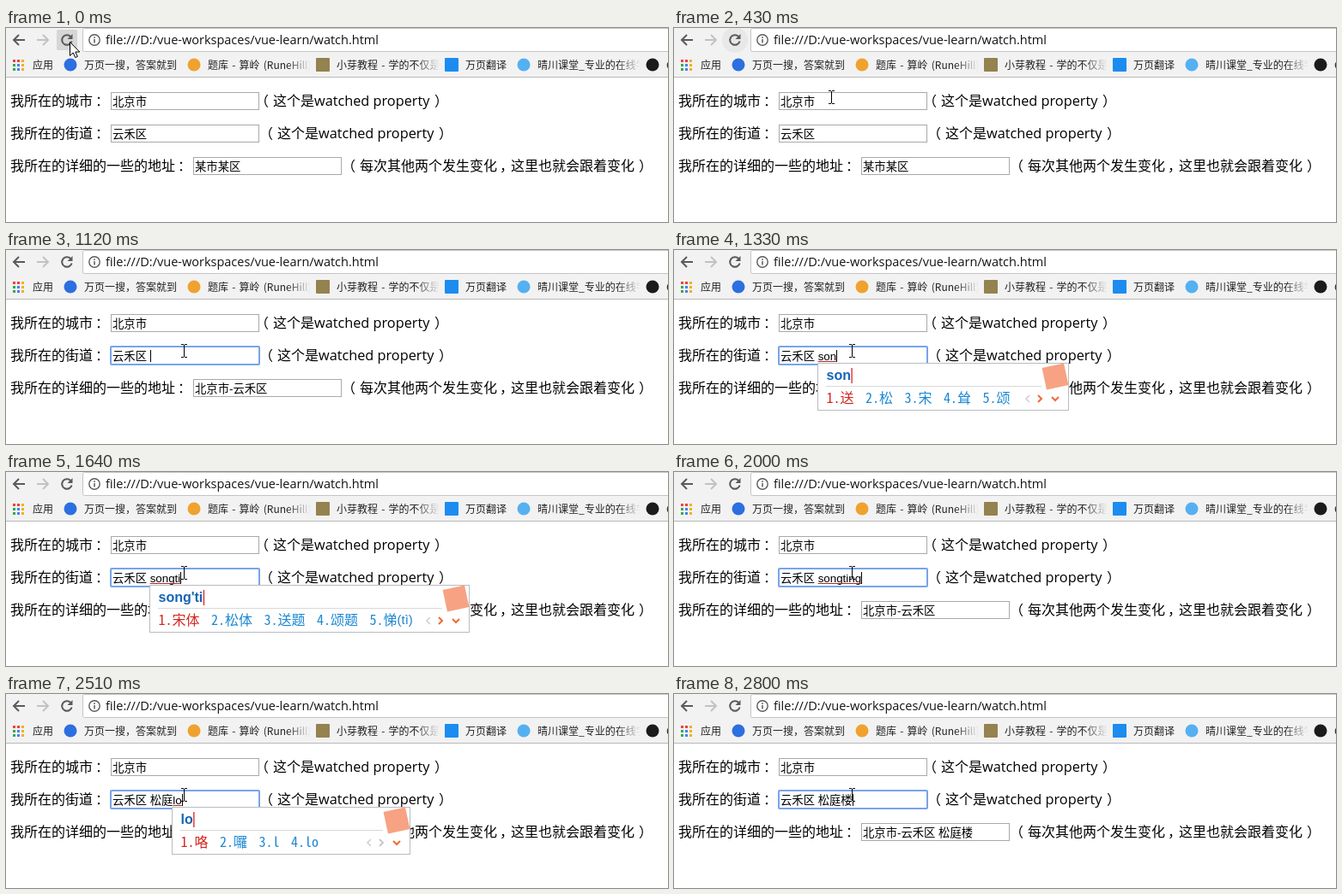
An HTML page for the animation above (3190 ms loop, 771x227 px).

```html
<!DOCTYPE html>
<html lang="zh-CN">
<head>
<meta charset="utf-8">
<title>watch</title>
<style>
html, body { margin: 0; width: 100%; height: 100%; overflow: hidden; background: #fff; }
svg { display: block; width: 771px; height: 227px; }
text { white-space: pre; }
.bar { font: 12px "Noto Sans CJK SC", sans-serif; word-spacing: 1.5px; fill: #222; }
.url { font: 14.5px "Open Sans", sans-serif; fill: #111; }
.page { font: 16px "Noto Sans CJK SC", sans-serif; fill: #000; }
.latin { font: 16.3px "Open Sans", sans-serif; fill: #000; }
.field { font: 13.333px "Liberation Sans", "Noto Sans CJK SC", sans-serif; fill: #000; }
.hint { font: bold 16px "Liberation Sans", sans-serif; fill: #1565b4; }
.pick { font: 16px "Noto Sans Mono CJK SC", "Noto Sans CJK SC", monospace; }
.note { font: 15px "Liberation Sans", sans-serif; }
</style>
</head>
<body>
<svg id="stage" viewBox="0 0 771 227">
  <defs>
    <linearGradient id="fade">
      <stop offset="0" stop-color="#f2f2f2" stop-opacity="0"/>
      <stop offset=".7" stop-color="#f2f2f2"/>
    </linearGradient>
  </defs>
</svg>
<script>
const LOOP = 3190;
const stage = document.getElementById('stage');

function el(tag, attrs, parent = stage) {
  const node = document.createElementNS('http://www.w3.org/2000/svg', tag);
  for (const key in attrs) node.setAttribute(key, attrs[key]);
  return parent.appendChild(node);
}
function box(x, y, width, height, fill, more, parent) {
  return el('rect', { x, y, width, height, fill, ...more }, parent);
}
function line(d, stroke, width, parent) {
  return el('path', { d, stroke, 'stroke-width': width, fill: 'none' }, parent);
}
function label(cls, x, y, str, parent, more) {
  const node = el('text', { class: cls, x, y, ...more }, parent);
  node.textContent = str;
  return node;
}
function show(node, on) {
  node.setAttribute('visibility', on ? 'visible' : 'hidden');
}

// Browser toolbar
box(0, 0, 771, 57, '#f2f2f2');
const hover = box(59, 2, 24, 24, '#d6d6d6', { rx: 2 });
const ripple = el('circle', { cx: 71, cy: 14, r: 15, fill: '#cfcfcf' });
line('M22 14H9M15 8L9 14L15 20', '#5a5a5a', 2);
line('M36 14H49M43 8L49 14L43 20', '#c2c2c2', 2);
line('M75.2 10A5.8 5.8 0 1 0 76.6 15.5', '#5a5a5a', 2);
el('path', { d: 'M77.5 7V13H71.5Z', fill: '#5a5a5a' });
box(89.5, 0.5, 690, 27, '#fff', { rx: 2, stroke: '#c4c4c4' });
el('circle', { cx: 103, cy: 14, r: 6.2, fill: 'none', stroke: '#5a5a5a', 'stroke-width': 1.4 });
line('M103 10.3V11.9M103 13V17.6', '#5a5a5a', 1.5);
label('url', 116, 19, 'file:///D:/vue-workspaces/vue-learn/watch.html');

// Bookmarks
const tints = ['#e8453c', '#e8453c', '#f2b01e', '#35a853', '#4285f4', '#f2b01e', '#35a853', '#4285f4', '#f2b01e'];
tints.forEach((c, i) => box(8 + i % 3 * 5, 37 + Math.floor(i / 3) * 5, 3, 3, c));
label('bar', 31, 48, '应用');

function bookmark(x, fill, round, str, long) {
  label('bar', x + 16, 48, str);
  if (long) box(x + 108, 32, 40, 24, 'url(#fade)');
  if (round) el('circle', { cx: x, cy: 43, r: 7.5, fill });
  else box(x - 8, 35, 16, 16, fill, { rx: 1 });
}
bookmark(75, '#2c6fe0', true, '万页一搜，答案就到');
bookmark(219, '#f0a22e', true, '题库 - 算岭 (RuneHill)', true);
bookmark(369, '#94824f', false, '小芽教程 - 学的不仅是技', true);
bookmark(519, '#1c8cf0', false, '万页翻译');
bookmark(603, '#55b0f2', true, '晴川课堂_专业的在线学', true);
bookmark(753, '#1b1b1b', true, 'O');
box(0, 57, 771, 1, '#b8b8b8');

// Page
function phrase(x, y, str) { label('page', x, y, str); }
function input(x, y, str) {
  box(x + 0.5, y + 0.5, 172, 20, '#fff', { stroke: '#a9a9a9' });
  return label('field', x + 2, y + 16, str);
}
function watched(x, y) {
  phrase(x - 21, y, '（');
  phrase(x, y, '这个是');
  label('latin', x + 48, y, 'watched property');
  phrase(x + 188, y, '）');
}
phrase(5, 91, '我所在的城市');
phrase(104, 91, '：');
input(122, 75, '北京市');
watched(311, 91);

phrase(5, 129, '我所在的街道');
phrase(104, 129, '：');
const street = input(122, 113, '');
const ring = box(122, 113, 173, 21, 'none', { rx: 1, stroke: '#78a4ea', 'stroke-width': 2 });
const caret = box(0, 117, 1, 14, '#000');
const under = box(0, 130, 0, 1, '#b02a2a');
watched(316, 129);

phrase(5, 167, '我所在的详细的一些的地址');
phrase(200, 167, '：');
const address = input(218, 151, '');
phrase(391, 167, '（');
phrase(412, 167, '每次其他两个发生变化');
phrase(575, 167, '，');
phrase(588, 167, '这里也就会跟着变化');
phrase(737, 167, '）');

// Input method window: right edge and candidates for each spelling
const menus = {
  "s": [460, '是 说 三 上 所'],
  "so": [460, '所 搜 送 松 嗽'],
  "son": [460, '送 松 宋 耸 颂'],
  "song": [460, '送 松 宋 颂 耸'],
  "song't": [540, '宋体 送他 松土 松塔 颂题'],
  "song'ti": [540, '宋体 松体 送题 颂题 悌(tì)'],
  "song'tin": [540, '颂听 松停 送停 宋体 听'],
  "song'ting": [554, '松庭 送停 颂听 松停 松(sōng)'],
  "l": [485, '了 来 啦 里 老'],
  "lo": [471, '咯 囉 l lo'],
  "lou": [509, '楼 搂 漏 露 陋(lòu)']
};
const menu = el('g', {});

function drawMenu(x, spell) {
  menu.textContent = '';
  if (!spell) return;
  const [right, words] = menus[spell];
  const list = words.split(' ');
  box(x + 0.5, 132.5, right - x - 1, 55, '#fff', { stroke: '#b9bcc0' }, menu);
  const hint = label('hint', x + 10.5, 152, spell, menu);
  box(x + 11 + hint.getComputedTextLength(), 138, 1.3, 18, '#e02020', {}, menu);
  box(x + 10, 159, right - x - 42, 1, '#d9d9d9', {}, menu);
  let left = x + 10.5;
  list.forEach((word, i) => {
    const fill = i ? '#1b87d2' : '#d5251f';
    const [main, note] = word.split('(');
    label('pick', left, 179, `${i + 1}.${main}`, menu, { fill });
    left += 16 + [...main].reduce((w, c) => w + (c > '~' ? 16 : 8), 0);
    if (note) label('note', left, 178, '(' + note, menu, { fill });
    left += 13.5;
  });
  const next = list.length > 4 ? '#ef6a35' : '#c9c9c9';
  line(`M${right - 46} 170l-4 4l4 4`, '#d0d0d0', 1.6, menu);
  line(`M${right - 36} 170l4 4l-4 4`, next, 2, menu);
  line(`M${right - 20} 172l4 4l4 -4`, '#ef6a35', 2, menu);
  box(right - 29, 135, 26, 26, '#f7a283', { transform: `rotate(-12 ${right - 16} 148)` }, menu);
}

// Pointers
const arrow = el('path', {
  d: 'M.5 .5V16.5L4.2 13L6.7 18.5L9.3 17.4L6.8 12H11.8Z',
  fill: '#fff', stroke: '#000', 'stroke-width': 1
});
const beam = line('M-3 -7.5H0M1 -7.5H4M.5 -7V7M-3 7.5H0M1 7.5H4', '#000', 1);

// time, x, y, over a field
const moves = [
  [0, 74, 16], [170, 78, 19], [240, 104, 35], [330, 150, 62],
  [430, 183, 81, 1], [480, 199, 99], [550, 206, 112], [630, 207, 118, 1]
];
// time, committed text after the district, spelling, window open
const keys = [
  [0, ''], [1030, '\u00a0'],
  [1190, '\u00a0', 's', 1], [1260, '\u00a0', 'so', 1], [1330, '\u00a0', 'son', 1],
  [1400, '\u00a0', 'song', 1], [1540, '\u00a0', "song't", 1], [1640, '\u00a0', "song'ti", 1],
  [1690, '\u00a0', "song'tin", 1], [1790, '\u00a0', "song'ting", 1], [2000, '\u00a0', "song'ting"],
  [2100, '\u00a0松庭'],
  [2240, '\u00a0松庭', 'l', 1], [2410, '\u00a0松庭', 'lo', 1], [2580, '\u00a0松庭', 'lou', 1],
  [2700, '\u00a0松庭', 'lou'], [2800, '\u00a0松庭楼']
];

const at = (steps, t) => steps.findLast(s => s[0] <= t);
let shown;

function drawKeys(key) {
  if (key === shown) return;
  shown = key;
  const [, tail, spell = '', open] = key;
  const done = '云禾区' + tail;
  street.textContent = done;
  const start = 124 + street.getComputedTextLength();
  street.textContent = done + spell.replace("'", '');
  const end = 124 + street.getComputedTextLength();
  caret.setAttribute('x', Math.round(end));
  under.setAttribute('x', start);
  under.setAttribute('width', end - start);
  address.textContent = tail ? '北京市-' + done : '某市某区';
  drawMenu(tail.length > 1 ? 193 : 167, open && spell);
}

function draw(t) {
  const [, x, y, text] = at(moves, t);
  show(arrow, !text);
  show(beam, text);
  (text ? beam : arrow).setAttribute('transform', `translate(${x} ${y})`);
  show(hover, t < 240);
  ripple.setAttribute('opacity', t < 100 ? 0 : Math.max(0, 1 - (t - 100) / 450));
  show(ring, t >= 780);
  show(caret, t >= 780);
  drawKeys(at(keys, t));
}

const begin = performance.now();
function tick() {
  draw((performance.now() - begin) % LOOP);
  requestAnimationFrame(tick);
}
tick();
</script>
</body>
</html>
```
